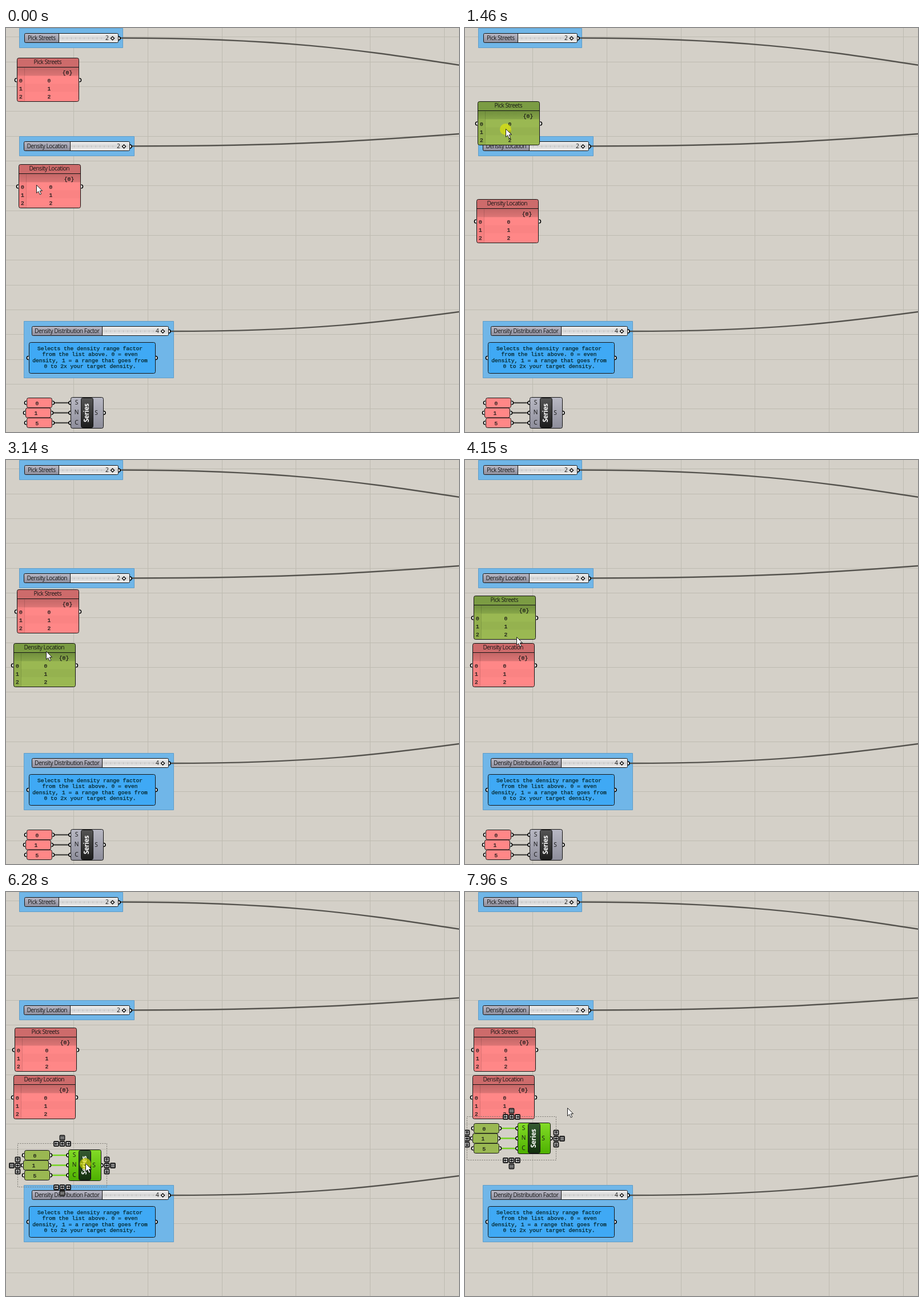
An HTML page with a canvas for the animation above (8000 ms loop, 793 by 706 pixels).

```html
<!DOCTYPE html>
<html lang="en">
<head>
<meta charset="utf-8">
<title>Node canvas</title>
<style>
html, body { margin: 0; width: 100%; height: 100%; overflow: hidden; background: #d4d0c8; }
canvas { display: block; }
</style>
</head>
<body>
<canvas id="stage" width="793" height="706"></canvas>
<script>
const ctx = document.getElementById('stage').getContext('2d');
const LOOP = 8000, STEP = 73;
const SANS = '"Open Sans", sans-serif', MONO = '"Liberation Mono", monospace';
const INK = '#151515';

// What the hand does: [item, first step, last step, x, y]. A dragged item carries the cursor along.
const actions = [
  ['density', 1, 10, 22, 301], ['density', 10, 11, 20, 299],
  ['cursor', 12, 16, 68, 100],
  ['streets', 17, 22, 24, 178], ['streets', 24, 26, 13, 219], ['streets', 26, 34, 19, 226],
  ['cursor', 35, 38, 77, 313],
  ['density', 39, 42, 13, 320],
  ['cursor', 43, 47, 80, 262],
  ['streets', 48, 53, 15, 237],
  ['cursor', 56, 66, 215, 633],
  ['marquee', 67, 71, 43, 681], ['marquee', 71, 73, 25, 701],
  ['cursor', 74, 79, 143, 669],
  ['series', 80, 86, 109, 450], ['series', 86, 91, 96, 411], ['series', 91, 100, 92, 403],
  ['cursor', 106, 109, 179, 377]];

function stateAt(step) {
  const at = { cursor: [53, 274], streets: [19, 52], density: [22, 238], marquee: [218, 633], series: [113, 645] };
  let held = null, picked = null;
  actions.forEach(([item, start, end, x, y], i) => {
    if (step < start) return;
    const u = Math.min(1, (step - start) / (end - start));
    const [x0, y0] = at[item];
    const dx = Math.round((x - x0) * u), dy = Math.round((y - y0) * u);
    at[item] = [x0 + dx, y0 + dy];
    held = null;
    if (item === 'cursor') {
      if (picked === 'marquee') picked = 'series';
      return;
    }
    at.cursor = [at.cursor[0] + dx, at.cursor[1] + dy];
    picked = item;
    if (step <= end || actions[i + 1][0] === item) held = item;
  });
  return { at, held, picked };
}

function gradient(y, h, ...colors) {
  const g = ctx.createLinearGradient(0, y, 0, y + h);
  colors.forEach((c, i) => g.addColorStop(i / (colors.length - 1), c));
  return g;
}

function paint(fill, stroke, width = 1) {
  if (fill) { ctx.fillStyle = fill; ctx.fill(); }
  if (stroke) { ctx.strokeStyle = stroke; ctx.lineWidth = width; ctx.stroke(); }
}

function box(x, y, w, h, r, fill, stroke, width) {
  ctx.beginPath();
  ctx.roundRect(x, y, w, h, r);
  paint(fill, stroke, width);
}

function polygon(points, fill, stroke, width) {
  ctx.beginPath();
  points.forEach(p => ctx.lineTo(...p));
  ctx.closePath();
  paint(fill, stroke, width);
}

function line(x0, y0, x1, y1, color, width = 1) {
  ctx.beginPath();
  ctx.moveTo(x0, y0);
  ctx.lineTo(x1, y1);
  paint(null, color, width);
}

function label(text, x, y, font, color = INK, spacing = 0) {
  ctx.font = font;
  ctx.fillStyle = color;
  ctx.letterSpacing = spacing + 'px';
  ctx.textAlign = 'center';
  ctx.fillText(text, x + spacing / 2, y + 3.5);
}
const title = (text, x, y) => label(text, x, y, '10.2px ' + SANS, INK, -0.5);

// Typewriter text, slightly thickened.
function mono(text, x, y, color = INK) {
  label(text, x, y, '9.6px ' + MONO, color);
  ctx.strokeStyle = color;
  ctx.lineWidth = .25;
  ctx.strokeText(text, x, y + 3.5);
}

// Half-round socket; side is -1 for left, 1 for right.
function grip(x, y, side) {
  ctx.beginPath();
  ctx.arc(x, y, 3, -Math.PI / 2, Math.PI / 2, side < 0);
  paint('#fff', '#000', 1.6);
}

// Level at both ends, steepest halfway.
function wire(x0, y0, x1, y1) {
  const mid = (x0 + x1) / 2;
  ctx.beginPath();
  ctx.moveTo(x0, y0);
  ctx.bezierCurveTo(mid, y0, mid, y1, x1, y1);
  paint(null, '#55534e', 2.5);
}

function slider(name, value, x, y, w, split) {
  const mid = y + 8, end = x + w;
  grip(end + .5, mid + .5, 1);
  box(x, y, w, 16, 2, gradient(y, 16, '#f4f4f4', '#d4d4d4', '#f2f2f2'));
  box(x, y, split, 16, [2, 0, 0, 2], gradient(y, 16, '#b9b9c6', '#8d8d9b'));
  line(x + split, y, x + split, y + 16, INK);
  box(x, y, w, 16, 2, null, INK);
  for (let tick = x + split + 7; tick < end - 24; tick += 7.5) line(tick, mid - 1, tick, mid + 2, '#bdbdbd');
  title(name, x + split / 2, mid);
  title(value, end - 19.5, mid);
  const cx = end - 10, cy = mid + .5;
  polygon([[cx, cy - 3], [cx + 3, cy], [cx, cy + 3], [cx - 3, cy]], '#fff', '#000', 1.3);
}

function listPanel(name, [left, top], selected) {
  const [body, column, head, shade] = selected
    ? ['#9ab852', '#91ae4c', '#7b9c43', '#708e3d']
    : ['#ff8787', '#f68080', '#cd6b6b', '#c36666'];
  ctx.save();
  ctx.translate(left + .5, top + .5);
  grip(-1, 38.5, -1);
  grip(109, 38.5, 1);
  box(0, 0, 108, 76, 3, body);
  box(0, 31, 12.5, 45, [0, 0, 0, 3], column);
  ctx.globalAlpha = .5;
  box(12.5, 45, 95, 14, 0, column);
  ctx.globalAlpha = 1;
  box(0, 16, 108, 15, 0, gradient(16, 15, shade, selected ? '#87a649' : '#dc7575'));
  line(13, 17, 13, 75, 'rgba(0,0,0,.13)');
  box(0, 0, 108, 16, [3, 3, 0, 0], head);
  line(0, 16, 108, 16, INK);
  box(0, 0, 108, 76, 3, null, INK);
  title(name, 53.5, 6.7);
  mono('{0}', 88, 24.5);
  for (let row = 0; row < 3; row++) {
    mono(row, 6.5, 39 + 14 * row);
    mono(row, 56, 39 + 14 * row);
  }
  ctx.restore();
}

function noteCard() {
  grip(39.5, 576.5, -1);
  grip(262, 576.5, 1);
  box(40.5, 549.5, 221, 54, 3, '#3fa9f5', INK);
  ['Selects the density range factor', 'from the list above. 0 = even',
    'density, 1 = a range that goes from', '0 to 2x your target density.']
    .forEach((text, i) => mono(text, 147, 559.3 + 10.4 * i, '#04252a'));
}

function seriesGroup(selected) {
  ['0', '1', '5'].forEach((value, row) => {
    const x = row % 2 ? -78.5 : -76.5, y = 1.5 + 17.5 * row, mid = y + 8.5;
    line(x + 45, mid, -1, mid, selected ? '#74d321' : '#4b4a46', 2.4);
    grip(x - 1, mid, -1);
    grip(x + 45, mid, 1);
    grip(0, mid, -1);
    box(x, y, 44, 17, 3, selected ? '#9ab852' : '#ff8787', INK);
    mono(value, x + 18, mid);
  });
  grip(58, 27.5, 1);
  box(.5, .5, 57, 54, 3, gradient(0, 55, ...(selected ? ['#83dc27', '#4db000'] : ['#b9b9c4', '#8d8d9a'])), INK);
  box(18.5, 1.5, 21, 52, 3, gradient(1, 52, ...(selected ? ['#345a30', '#122f0d'] : ['#555', '#1d1d1d'])), INK);
  ['S', 'N', 'C'].forEach((name, row) => title(name, 10.5, 9.5 + 17.3 * row));
  title('S', 45, 27);
  ctx.save();
  ctx.translate(28.5, 27.5);
  ctx.rotate(-Math.PI / 2);
  label('Series', 0, 0, 'bold 11.5px ' + SANS, '#fff', -0.3);
  ctx.restore();
}

function button(x, y, drawGlyph) {
  ctx.save();
  ctx.translate(x, y);
  box(-4, -4, 8, 8, 1, '#c8c8c8', '#1c1c1c', 1.9);
  drawGlyph();
  ctx.restore();
}
const plus = () => { line(-2.5, 0, 2.5, 0, '#111', 1.6); line(0, -2.5, 0, 2.5, '#111', 1.6); };
const bars = () => [-2, 0, 2].forEach(y => line(-2.5, y, 2.5, y, '#222'));
const arrow = side => () => {
  line(-2.5 * side, 0, side, 0, '#111', 1.4);
  polygon([[3 * side, 0], [0, -2.7], [0, 2.7]], '#111');
};

// Dotted frame with the same four buttons on every side.
function alignFrame() {
  ctx.setLineDash([2, 2]);
  box(-88.5, -10.5, 156, 76, 0, null, '#77756f');
  ctx.setLineDash([]);
  for (let side = 0; side < 4; side++) {
    const edge = side % 2 ? -78 : -38;
    ctx.save();
    ctx.translate(-10.5, 28);
    ctx.rotate(side * Math.PI / 2);
    button(-10.5, edge, arrow(-1));
    button(0, edge, plus);
    button(10.5, edge, arrow(1));
    button(0, edge - 10.5, bars);
    ctx.restore();
  }
}

function pointer(x, y, down) {
  if (down) {
    ctx.beginPath();
    ctx.arc(x, y + 1, 10, 0, 7);
    paint('rgba(235,235,0,.6)');
  }
  ctx.save();
  ctx.translate(x + .5, y + .5);
  polygon([[0, 0], [0, 14], [3.2, 11], [5.8, 16.6], [8.2, 15.5], [5.7, 10.2], [10, 10]], '#fff', '#222');
  ctx.restore();
}

function background() {
  ctx.fillStyle = '#d4d0c8';
  ctx.fillRect(0, 0, 793, 706);
  ctx.fillStyle = '#bebbb1';
  for (let x = 119; x < 793; x += 129.8) ctx.fillRect(Math.round(x) - 1, 0, 1, 706);
  for (let y = 15.4; y < 706; y += 43.33) ctx.fillRect(0, Math.round(y), 793, 1);
  for (const [x, y, w, h] of [[23.5, .5, 181, 34], [23.5, 189.5, 201, 34], [31.5, 512.5, 262, 99]])
    box(x, y, w, h, 0, '#70b6e8', '#609dc8');
  wire(198, 17.5, 1318, 101.5);
  wire(218, 206.5, 1368, 163.5);
  wire(286, 530, 1300, 462);
  slider('Pick Streets', '2', 32.5, 9.5, 164, 60);
  slider('Density Location', '2', 31.5, 198.5, 185, 81);
  slider('Density Distribution Factor', '4', 45.5, 521.5, 239, 123);
  noteCard();
}

function draw(time) {
  const step = Math.floor((time % LOOP + 13) / STEP);
  const { at, held, picked } = stateAt(step);
  const marquee = [216, 633, at.marquee[0] - 216, at.marquee[1] - 633];

  background();
  listPanel('Pick Streets', at.streets, picked === 'streets');
  listPanel('Density Location', at.density, picked === 'density');

  if (held === 'marquee') box(...marquee, 0, 'rgba(130,132,255,.5)');
  ctx.save();
  ctx.translate(...at.series);
  seriesGroup(picked === 'series');
  if (picked === 'series') alignFrame();
  ctx.restore();
  if (held === 'marquee') {
    ctx.setLineDash([2, 2]);
    box(...marquee, 0, 'rgba(130,132,255,.2)', '#111');
    ctx.setLineDash([]);
  }
  pointer(...at.cursor, held);
}

function tick() {
  draw(performance.now());
  requestAnimationFrame(tick);
}
tick();
</script>
</body>
</html>
```
